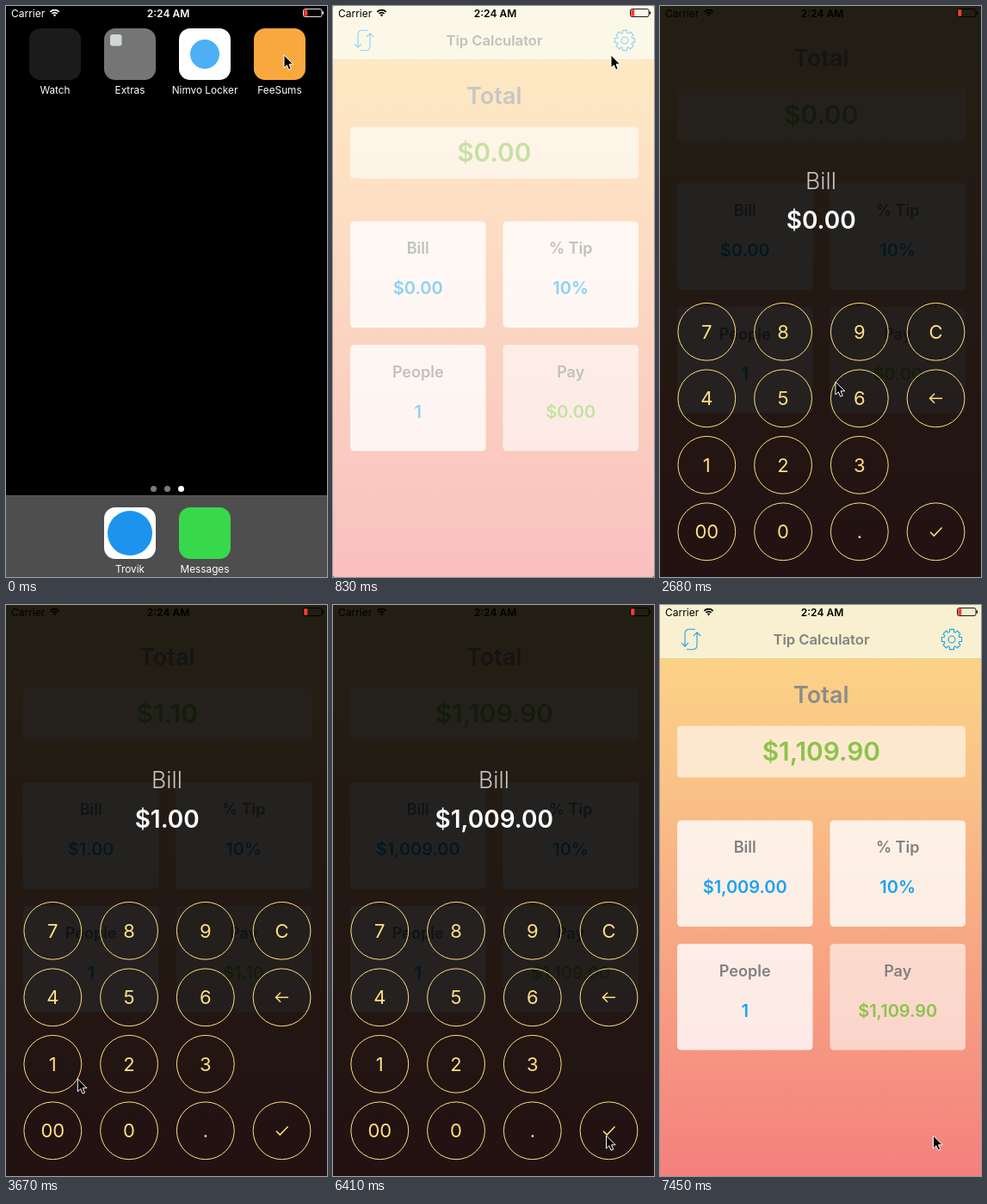
Recreate the animation shown at these times as an HTML page with a canvas. Size 373 px wide and 664 px high, loop 8 s.

```html
<!DOCTYPE html>
<html lang="en">
<head>
<meta charset="utf-8">
<title>Tip Calculator</title>
<style>
  html, body { margin: 0; width: 100%; height: 100%; overflow: hidden; background: #000; }
  canvas { display: block; width: 373px; height: 664px; }
</style>
</head>
<body>
<canvas id="stage"></canvas>
<script>
const W = 373, H = 664, LOOP = 8000;
const FONT = 'Inter, "Open Sans", sans-serif';
const GRAY = '#808080', BLUE = '#1ba3ee', GREEN = '#8bc34a', YELLOW = '#ffe082';

const canvas = document.getElementById('stage');
const ctx = canvas.getContext('2d');
const dpr = window.devicePixelRatio || 1;
canvas.width = W * dpr;
canvas.height = H * dpr;

const clamp = v => Math.max(0, Math.min(1, v));
const lerp = (a, b, k) => a + (b - a) * k;
const span = (t, from, to) => clamp((t - from) / (to - from));
const easeOut = k => 1 - (1 - k) ** 4;
const easeInOut = k => k * k * (3 - 2 * k);
const money = v => '$' + v.toLocaleString('en-US', { minimumFractionDigits: 2, maximumFractionDigits: 2 });

// Vertical position is the middle of the capital letters.
function text(str, x, cy, size, weight, color, align = 'center') {
  ctx.font = `${weight} ${size}px ${FONT}`;
  ctx.textAlign = align;
  ctx.fillStyle = color;
  ctx.fillText(str, x, cy + size * 0.364);
}

function box(x, y, w, h, r, color) {
  ctx.beginPath();
  ctx.roundRect(x, y, w, h, r);
  ctx.fillStyle = color;
  ctx.fill();
}

function disc(x, y, r, color) {
  ctx.beginPath();
  ctx.arc(x, y, r, 0, Math.PI * 2);
  ctx.fillStyle = color;
  ctx.fill();
}

function line(points, color, width) {
  ctx.beginPath();
  points.forEach(([x, y]) => ctx.lineTo(x, y));
  ctx.strokeStyle = color;
  ctx.lineWidth = width;
  ctx.stroke();
}

// ---- status bar -------------------------------------------------------

function statusBar(color) {
  text('Carrier', 6, 8.2, 12, 400, color, 'left');
  text('2:24 AM', 188.5, 8.2, 12, 600, color);

  ctx.strokeStyle = color;
  ctx.lineWidth = 1.7;
  for (const r of [4.4, 7.3]) {
    ctx.beginPath();
    ctx.arc(56.5, 12, r, -Math.PI * 0.75, -Math.PI * 0.25);
    ctx.stroke();
  }
  ctx.beginPath();
  ctx.moveTo(56.5, 12.4);
  ctx.arc(56.5, 12, 2.3, -Math.PI * 0.75, -Math.PI * 0.25);
  ctx.fillStyle = color;
  ctx.fill();

  ctx.beginPath();
  ctx.roundRect(345.5, 3.5, 21.5, 9, 2);
  ctx.lineWidth = 0.9;
  ctx.stroke();
  box(367.6, 6.3, 1.4, 3.4, 0.7, color);
  box(346.3, 4.3, 4, 7.4, 0.8, '#ff3b30');
}

// ---- home screen ------------------------------------------------------

const TILE = 60, APP_X = 288, APP_Y = 26, APP_COLOR = '#f9a83f';

function tile(x, y, color, label) {
  box(x, y, TILE, TILE, 13, color);
  text(label, x + TILE / 2, y + 72, 11.8, 400, '#fff');
}

function home(pressed) {
  tile(27, 26, '#1b1b1b', 'Watch');
  tile(114, 26, '#757575', 'Extras');
  box(121, 33, 13.5, 13.5, 3, '#d2d6d6');
  tile(201, 26, '#fff', 'Nimvo Locker');
  disc(231, 56, 17, '#4db0f4');
  tile(APP_X, APP_Y, APP_COLOR, 'FeeSums');
  if (pressed) box(APP_X, APP_Y, TILE, TILE, 13, 'rgba(0,0,0,.45)');

  disc(171.5, 561.5, 3.5, '#7c7c7c');
  disc(187.5, 561.5, 3.5, '#7c7c7c');
  disc(203.5, 561.5, 3.5, '#fff');

  ctx.fillStyle = '#4e4e4e';
  ctx.fillRect(0, 569, W, 95);
  ctx.fillStyle = '#5c5c5c';
  ctx.fillRect(0, 569, W, 1);
  tile(114, 583, '#fff', 'Trovik');
  disc(144, 613, 26, '#1c94ee');
  tile(201, 583, '#38d84c', 'Messages');
}

// ---- calculator -------------------------------------------------------

function gear(x, y) {
  const teeth = 8, pts = [];
  const shape = [[-0.27, 11.9], [0.27, 11.9], [0.38, 9], [0.62, 9]];
  for (let i = 0; i < teeth; i++) {
    for (const [part, r] of shape) {
      const a = (i + part) * Math.PI * 2 / teeth;
      pts.push([x + r * Math.sin(a), y - r * Math.cos(a)]);
    }
  }
  pts.push(pts[0]);
  ctx.lineJoin = 'round';
  line(pts, BLUE, 1.1);
  ctx.beginPath();
  ctx.arc(x, y, 4, 0, Math.PI * 2);
  ctx.stroke();
}

function swapIcon(x, y) {
  ctx.save();
  ctx.translate(x, y);
  for (let i = 0; i < 2; i++) {
    ctx.beginPath();
    ctx.moveTo(5, -11.7);
    ctx.lineTo(-2, -11.7);
    ctx.quadraticCurveTo(-7, -11.7, -7, -6.7);
    ctx.lineTo(-7, 8);
    ctx.moveTo(-11, 4.2);
    ctx.lineTo(-7, 8.2);
    ctx.lineTo(-3, 4.2);
    ctx.strokeStyle = BLUE;
    ctx.lineWidth = 1.1;
    ctx.stroke();
    ctx.rotate(Math.PI);
  }
  ctx.restore();
}

function navBar(y, dim) {
  ctx.save();
  ctx.translate(0, y);
  ctx.fillStyle = dim ? '#cbcac6' : '#f8f0d0';
  ctx.fillRect(0, 0, W, 62);
  ctx.fillStyle = dim ? '#8f8d88' : '#dccb9c';
  ctx.fillRect(0, 62, W, 0.7);
  text('Tip Calculator', 187.5, 40, 16.6, 600, GRAY);
  swapIcon(36, 40);
  gear(339, 40);
  ctx.restore();
}

function card(x, y, label, value, color, alpha) {
  box(x, y, 157.5, 123.5, 4.5, `rgba(255,255,255,${alpha})`);
  text(label, x + 78.7, y + 31, 18, 600, GRAY);
  text(value, x + 78.7, y + 77.7, 20, 600, color);
}

function calculator(bill, shift) {
  const sky = ctx.createLinearGradient(0, 0, 0, H);
  sky.addColorStop(0, '#fcd986');
  sky.addColorStop(0.3, '#fac387');
  sky.addColorStop(1, '#f4807e');
  ctx.fillStyle = sky;
  ctx.fillRect(0, 0, W, H);

  const due = money(bill * 1.1);
  ctx.save();
  ctx.translate(0, -shift);
  text('Total', 187.3, 103.8, 27, 600, '#8c8c8c');
  box(20, 140.5, 335, 60, 4.5, 'rgba(255,255,255,.6)');
  text(due, 187.3, 170.5, 29.8, 600, GREEN);
  card(20, 250.5, 'Bill', money(bill), BLUE, 0.8);
  card(197.5, 250.5, '% Tip', '10%', BLUE, 0.8);
  card(20, 394, 'People', '1', BLUE, 0.8);
  card(197.5, 394, 'Pay', due, GREEN, 0.6);
  ctx.restore();
}

const KEYS = ['7', '8', '9', 'C', '4', '5', '6', 'back', '1', '2', '3', '', '00', '0', '.', 'ok'];

function keypad(bill) {
  ctx.fillStyle = 'rgba(0,0,0,.86)';
  ctx.fillRect(0, 0, W, H);
  text('Bill', 187, 203.8, 26.5, 300, '#c6c4c2');
  text(money(bill), 187.2, 248.5, 28, 600, '#fff');

  KEYS.forEach((key, i) => {
    if (!key) return;
    const x = 54.3 + (i % 4) * 88.75, y = 378.8 + Math.floor(i / 4) * 77.5;
    ctx.beginPath();
    ctx.arc(x, y, 33.4, 0, Math.PI * 2);
    ctx.strokeStyle = YELLOW;
    ctx.lineWidth = 1;
    ctx.stroke();
    if (key === 'back') {
      line([[x + 7.5, y], [x - 7, y]], YELLOW, 1.5);
      line([[x - 1.5, y - 5.5], [x - 7, y], [x - 1.5, y + 5.5]], YELLOW, 1.5);
    } else if (key === 'ok') {
      line([[x - 6.5, y + 0.5], [x - 2.2, y + 4.8], [x + 7, y - 4.8]], YELLOW, 1.5);
    } else {
      text(key, x, y, 22, 400, YELLOW);
    }
  });
}

// ---- pointer ----------------------------------------------------------

// time, x, y
const PATH = [
  [0, 323, 57], [900, 323, 57], [1060, 332, 86], [1180, 342, 124],
  [2360, 342, 124], [2680, 204, 437], [2790, 195, 443],
  [2930, 195, 443], [3430, 84, 548],
  [3640, 84, 548], [4180, 63, 635], [4450, 67, 623],
  [4490, 67, 623], [4680, 94, 567], [5190, 236, 386],
  [5520, 236, 386], [5940, 317.5, 639],
  [6140, 317.5, 639], [6410, 317.5, 617], [LOOP, 317.5, 617]
];

function pointer(t) {
  const i = PATH.findIndex(p => p[0] > t);
  const [t0, x0, y0] = PATH[i - 1], [t1, x1, y1] = PATH[i];
  const k = easeInOut(span(t, t0, t1)) * 0.5 + span(t, t0, t1) * 0.5;
  ctx.save();
  ctx.translate(lerp(x0, x1, k), lerp(y0, y1, k));
  ctx.beginPath();
  [[0, 0], [0, 15], [3.4, 11.8], [5.7, 17.2], [8.3, 16.1], [6, 10.8], [10.7, 10.8]]
    .forEach(([x, y]) => ctx.lineTo(x, y));
  ctx.closePath();
  ctx.fillStyle = '#000';
  ctx.fill();
  ctx.strokeStyle = '#fff';
  ctx.lineWidth = 1;
  ctx.stroke();
  ctx.restore();
}

// ---- scenes -----------------------------------------------------------

const billAt = t => t < 3670 ? 0 : t < 4510 ? 1 : t < 5550 ? 100 : 1009;

function app(t) {
  const open = t >= 1660 && t < 7250;
  const hidden = easeInOut(span(t, 1660, 1860)) - easeInOut(span(t, 7250, 7450));
  const bill = billAt(t);
  calculator(bill, 44 * hidden);
  if (open) keypad(bill);
  if (hidden < 1) navBar(-64 * hidden, open);
  statusBar('#000');
}

function launch(t) {
  const k = easeOut(span(t, 270, 880));
  const x = lerp(APP_X, 0, k), y = lerp(APP_Y, 0, k);
  const w = lerp(TILE, W, k), h = lerp(TILE, H, k);

  // The icons grow outwards together with the opening window.
  const s = w / TILE;
  ctx.save();
  ctx.globalAlpha = 1 - k;
  ctx.translate(x, y + (h - w) / 2);
  ctx.scale(s, s);
  ctx.translate(-APP_X, -APP_Y);
  home(false);
  ctx.restore();

  ctx.save();
  ctx.beginPath();
  ctx.roundRect(x, y, w, h, lerp(13, 2, k));
  ctx.clip();
  ctx.save();
  ctx.translate(x, y);
  ctx.scale(w / W, h / H);
  calculator(0, 0);
  navBar(0, false);
  ctx.restore();
  ctx.globalAlpha = 1 - span(t, 600, 1060);
  ctx.fillStyle = '#fff';
  ctx.fillRect(x, y, w, h);
  ctx.globalAlpha = clamp(1 - k * 2);
  ctx.fillStyle = APP_COLOR;
  ctx.fillRect(x, y, w, h);
  ctx.restore();
  statusBar(k > 0.8 ? '#000' : '#fff');
}

function draw(now) {
  const t = now % LOOP;
  ctx.setTransform(dpr, 0, 0, dpr, 0, 0);
  ctx.fillStyle = '#000';
  ctx.fillRect(0, 0, W, H);
  if (t < 270) {
    home(t >= 70);
    statusBar('#fff');
  } else if (t < 1060) {
    launch(t);
  } else {
    app(t);
  }
  pointer(t);
}

const start = performance.now();
function tick() {
  draw(performance.now() - start);
  requestAnimationFrame(tick);
}
tick();
</script>
</body>
</html>
```
